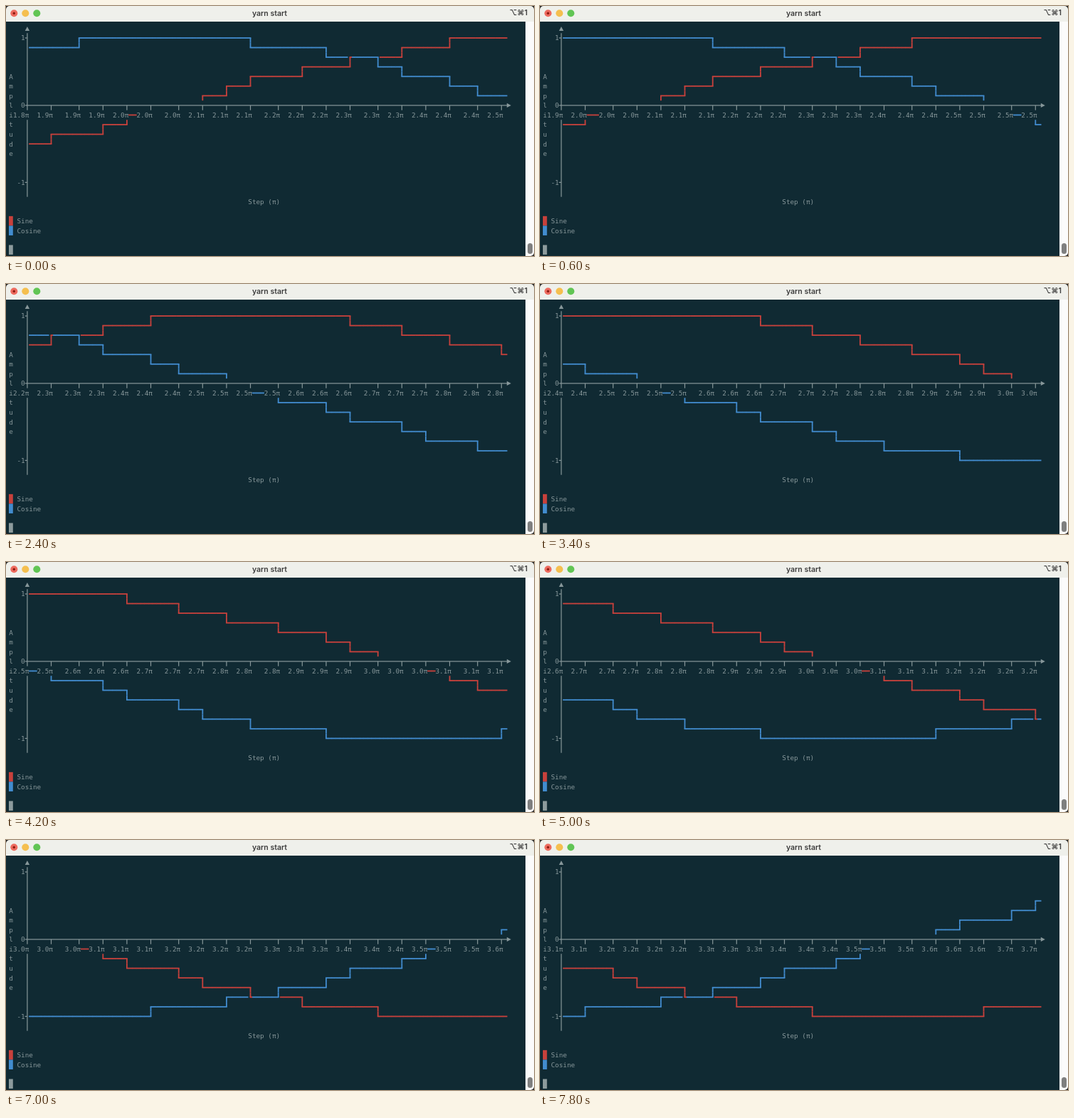
An HTML page with a canvas that plays this animation: 742 px wide and 352 px high, repeating every 8 s.

```html
<!DOCTYPE html>
<html lang="en">
<head>
<meta charset="utf-8">
<title>yarn start</title>
<style>
  html, body { margin: 0; width: 100%; height: 100%; overflow: hidden; background: #222; }
  canvas { display: block; width: 742px; height: 352px; border-radius: 5px; }
</style>
</head>
<body>
<canvas id="stage"></canvas>
<script>
const W = 742, H = 352, STEP_MS = 200, LOOP_MS = 8000;
const CELL_W = 5.6, CELL_H = 13.56, LEFT = 4.3, ROW0 = 45;
const POINTS = 20, AXIS_COL = 4, END_COL = 124, ZERO_ROW = 7, LABEL_ROW = 8;
const BACK = '#102a33', TEXT = '#87979a', RED = '#c8413c', BLUE = '#428ccf';
const L = 1, R = 2, U = 4, D = 8;
const series = [[Math.sin, RED], [Math.cos, BLUE]];

const canvas = document.getElementById('stage');
const ctx = canvas.getContext('2d');
const dpr = window.devicePixelRatio || 1;
canvas.width = W * dpr;
canvas.height = H * dpr;
ctx.scale(dpr, dpr);

const cellX = col => LEFT + col * CELL_W;
const midX = col => cellX(col) + CELL_W / 2 + 0.4;
const midY = row => ROW0 + row * CELL_H;
const tickCol = k => AXIS_COL + Math.round(6.25 * k);
const rowOf = v => Math.round((1 - v) * 7.5);

function rect(x, y, w, h, color) {
  ctx.fillStyle = color;
  ctx.fillRect(x, y, w, h);
}

function dot(x, y, r, color) {
  ctx.fillStyle = color;
  ctx.beginPath();
  ctx.arc(x, y, r, 0, 7);
  ctx.fill();
}

function triangle(...p) {
  ctx.fillStyle = TEXT;
  ctx.beginPath();
  ctx.moveTo(p[0], p[1]);
  ctx.lineTo(p[2], p[3]);
  ctx.lineTo(p[4], p[5]);
  ctx.fill();
}

function write(text, col, row) {
  ctx.font = '9.3px "DejaVu Sans Mono", monospace';
  ctx.textAlign = 'left';
  ctx.fillStyle = TEXT;
  ctx.fillText(text, cellX(col), midY(row) + 3.4);
}

function block(row, color) {
  rect(4, midY(row) - CELL_H / 2, 5.8, CELL_H, color);
}

function drawWindow() {
  rect(0, 0, W, H, BACK);
  rect(730, 22, 12, 330, '#fbfbfb');
  ctx.fillStyle = '#7f7f7f';
  ctx.beginPath();
  ctx.roundRect(733, 334, 7, 15, 3.5);
  ctx.fill();

  rect(0, 0, W, 22, '#eff0eb');
  dot(11.3, 10.3, 5, '#ed6a5e');
  dot(11.3, 10.3, 1.7, '#8c1a10');
  dot(27.3, 10.3, 5, '#f5bf4f');
  dot(43.3, 10.3, 5, '#61c554');
  ctx.fillStyle = '#3c3c3c';
  ctx.textAlign = 'center';
  ctx.font = '600 10.5px Inter, sans-serif';
  ctx.fillText('yarn start', 370.5, 13.7);
  ctx.textAlign = 'right';
  ctx.font = '600 10.5px Inter, "DejaVu Sans", sans-serif';
  ctx.fillText('⌥⌘1', 733, 13);
}

function drawAxes() {
  const x = midX(AXIS_COL), y = midY(ZERO_ROW), half = CELL_H / 2, thin = 1.2;
  const vertical = (top, bottom) => rect(x - thin / 2, top, thin, bottom - top, TEXT);
  vertical(midY(0) - half, midY(ZERO_ROW) + half);
  vertical(midY(LABEL_ROW) + half, midY(16) + half);
  for (const row of [0, ZERO_ROW, 15]) {
    rect(cellX(AXIS_COL), midY(row) - thin / 2, x - cellX(AXIS_COL), thin, TEXT);
  }
  rect(x, y - thin / 2, cellX(END_COL + 1) - x, thin, TEXT);
  for (let k = 1; k < POINTS; k++) {
    rect(midX(tickCol(k)) - thin / 2, y, thin, half, TEXT);
  }
  triangle(x, 29, x + 3.2, 35, x - 3.2, 35);
  triangle(709.8, y, 703.8, y - 3.1, 703.8, y + 3.1);
  write('1', 3, 0);
  write('0', 3, ZERO_ROW);
  write('-1', 2, 15);
  [...'Amplitude'].forEach((c, i) => write(c, 0, 4 + i));
  write('Step (π)', 60, 17);
  block(19, RED);
  write('Sine', 2, 19);
  block(20, BLUE);
  write('Cosine', 2, 20);
  block(22, '#8d9b9d');
}

// Corners replace any line already in their cell.
function plotCells(angles) {
  const cells = new Map();
  const put = (row, col, color, dirs) => cells.set(row * 200 + col, { row, col, color, dirs });
  for (const [fn, color] of series) {
    angles.forEach((a, k) => {
      const end = k < POINTS - 1 ? tickCol(k + 1) : END_COL;
      for (let col = tickCol(k) + 1; col <= end; col++) put(rowOf(fn(a)), col, color, L | R);
    });
  }
  for (const [fn, color] of series) {
    for (let k = 1; k < POINTS; k++) {
      const from = rowOf(fn(angles[k - 1])), to = rowOf(fn(angles[k])), col = tickCol(k);
      if (from === to) continue;
      put(from, col, color, L | (to > from ? D : U));
      put(to, col, color, R | (to > from ? U : D));
    }
  }
  return cells.values();
}

function drawCell({ row, col, color, dirs }) {
  const x = midX(col), y = midY(row), w = 0.9, half = CELL_H / 2;
  const left = dirs & L ? cellX(col) - 0.2 : x - w;
  const right = dirs & R ? cellX(col + 1) + 0.2 : x + w;
  rect(left, y - w, right - left, 2 * w, color);
  if (dirs & U) rect(x - w, y - half, 2 * w, half, color);
  if (dirs & D) rect(x - w, y, 2 * w, half, color);
}

function draw(step) {
  const angles = Array.from({ length: POINTS }, (_, k) => (58 + step + k) / 10);
  const labelled = new Set();
  angles.forEach((_, k) => {
    for (let i = 0; i < 4; i++) labelled.add(tickCol(k) - i);
  });
  drawWindow();
  for (const cell of plotCells(angles)) {
    const hidden = cell.row === ZERO_ROW || (cell.row === LABEL_ROW && labelled.has(cell.col));
    if (!hidden) drawCell(cell);
  }
  drawAxes();
  angles.forEach((a, k) => write((a / Math.PI).toFixed(1) + 'π', tickCol(k) - 3, LABEL_ROW));
}

let shown = -1;
function tick() {
  const step = Math.floor((performance.now() % LOOP_MS) / STEP_MS);
  if (step !== shown) draw(shown = step);
  requestAnimationFrame(tick);
}
tick();
</script>
</body>
</html>
```
